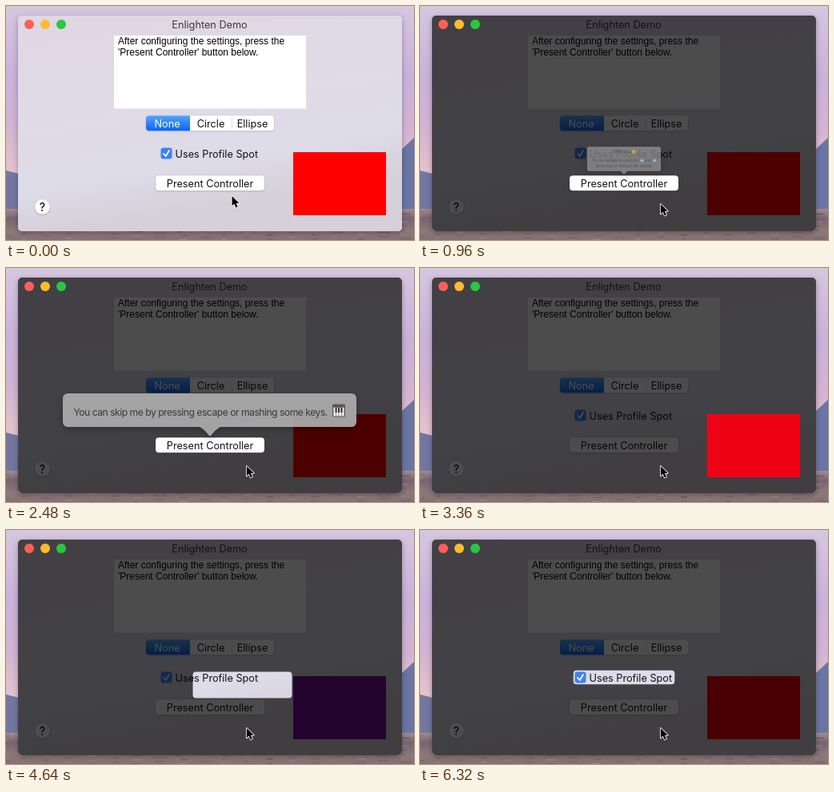
An HTML page with a canvas for the animation above (6.56 s loop, 510 by 293 pixels).

```html
<!DOCTYPE html>
<html lang="en">
<head>
<meta charset="utf-8">
<title>Enlighten Demo</title>
<style>
html, body { margin: 0; width: 100%; height: 100%; overflow: hidden; }
canvas { display: block; }
</style>
</head>
<body>
<canvas id="stage" width="510" height="293"></canvas>
<script>
const g = document.getElementById('stage').getContext('2d');
const LOOP = 6560, STEP = 80;
const UI = 'Inter, sans-serif', MONO = '"Noto Sans Mono", monospace', FIELD = '"Liberation Sans", Arial, sans-serif';
const BUTTON = [187, 212.3, 136, 19], VIEW = [359, 183, 116, 79], CHECK = [191.7, 175.7, 126.6, 17.6];
const RED = [255, 0, 0], PURPLE = [118, 13, 157];

const lerp = (a, b, k) => a + (b - a) * k;
const mix = (a, b, k) => a.map((v, i) => lerp(v, b[i], k));

// Piecewise linear track of [time, value] pairs.
function track(t, ...keys) {
  const n = keys.findIndex(k => k[0] > t);
  if (n === 0) return keys[0][1];
  if (n < 0) return keys[keys.length - 1][1];
  const [t0, a] = keys[n - 1], [t1, b] = keys[n];
  const k = (t - t0) / (t1 - t0);
  return Array.isArray(a) ? mix(a, b, k) : lerp(a, b, k);
}

function gradient(x0, y0, x1, y1, ...stops) {
  const paint = g.createLinearGradient(x0, y0, x1, y1);
  stops.forEach(([p, c]) => paint.addColorStop(p, c));
  return paint;
}
function rect(x, y, w, h, fill) {
  g.fillStyle = fill;
  g.fillRect(x, y, w, h);
}
function round(x, y, w, h, r, fill) {
  g.fillStyle = fill;
  g.beginPath();
  g.roundRect(x, y, w, h, r);
  g.fill();
}
function circle(x, y, r, fill) {
  g.fillStyle = fill;
  g.beginPath();
  g.arc(x, y, r, 0, 7);
  g.fill();
}
function poly(points, fill) {
  g.fillStyle = fill;
  g.beginPath();
  points.forEach(p => g.lineTo(...p));
  g.closePath();
  g.fill();
}
function text(s, x, y, { font = '12.7px ' + UI, color = '#111', align = 'left', spacing = 0 } = {}) {
  g.font = font;
  g.fillStyle = color;
  g.textAlign = align;
  g.letterSpacing = spacing + 'px';
  g.fillText(s, x, y);
}
function shadow(blur, alpha, dy, draw) {
  g.save();
  g.shadowBlur = blur;
  g.shadowOffsetY = dy;
  g.shadowColor = `rgba(0,0,0,${alpha})`;
  draw();
  g.restore();
}

function desktop() {
  rect(0, 0, 510, 293, gradient(0, 0, 0, 255,
    [0, '#d6c6de'], [.35, '#c9b2da'], [.6, '#d3b3d2'], [.8, '#e2c2cd'], [1, '#dcc4c8']));
  poly([[0, 206], [16, 210], [60, 232], [60, 258], [0, 258]], '#73779f');
  poly([[510, 165], [494, 180], [460, 215], [460, 255], [510, 255]], '#6a75a3');
  rect(0, 254, 510, 39, gradient(0, 254, 0, 293, [0, '#a48c92'], [.3, '#776470'], [.7, '#8d7779'], [1, '#857174']));
  // Rough desert floor.
  for (let i = 0; i < 160; i++) {
    const x = i * 83.7 % 530 - 10, y = 257 + i * 7.31 % 36;
    rect(x, y, 5 + i % 9, 1, i % 3 ? 'rgba(60,45,60,.28)' : 'rgba(220,190,180,.3)');
  }
}

function appWindow(view, pressed) {
  shadow(6, .3, 2, () => round(15, 12, 480, 270, 5, '#ddd8e2'));
  round(15, 12, 480, 270, 5, gradient(15, 12, 60, 282,
    [0, '#dfd7e3'], [.45, '#dfdae6'], [.8, '#dddce8'], [1, '#d6d0da']));
  text('Enlighten Demo', 254.5, 28, { align: 'center', color: '#3c3a3d' });

  rect(135, 37, 240, 91.5, '#fff');
  const field = { font: '12px ' + FIELD, color: '#000' };
  text('After configuring the settings, press the', 140, 48, field);
  text("'Present Controller' button below.", 140, 62, field);

  shadow(2, .25, .5, () => round(175, 137.3, 160, 19, 4, '#fff'));
  round(175, 137.3, 55, 19, [4, 0, 0, 4], gradient(0, 137, 0, 157, [0, '#55a5fa'], [1, '#0a62f5']));
  rect(282, 140, 1, 14, '#ddd');
  text('None', 201.5, 151.5, { align: 'center', color: '#fff' });
  text('Circle', 256, 151.5, { align: 'center' });
  text('Ellipse', 308, 151.5, { align: 'center' });

  round(193.5, 177.5, 14, 14, 3, '#3b82f6');
  g.strokeStyle = '#fff';
  g.lineWidth = 1.8;
  g.lineCap = g.lineJoin = 'round';
  g.beginPath();
  [[197, 185], [199.7, 188], [204, 181]].forEach(p => g.lineTo(...p));
  g.stroke();
  text('Uses Profile Spot', 211.5, 189.5);

  shadow(2, .3, .5, () => round(...BUTTON, 4, pressed ? '#2f7df6' : '#fff'));
  text('Present Controller', 255, 226.5, { align: 'center', color: pressed ? '#fff' : '#111' });

  shadow(2, .3, .5, () => circle(45.5, 251.5, 9.5, '#fff'));
  text('?', 45.5, 256.5, { align: 'center', font: '500 14px ' + UI });

  rect(...VIEW, `rgb(${view.map(Math.round)})`);
}

function dim(alpha, spot) {
  g.fillStyle = `rgba(0,0,0,${alpha})`;
  g.beginPath();
  g.roundRect(15, 12, 480, 270, 5);
  g.roundRect(...spot, spot === VIEW ? 0 : 4);
  g.fill('evenodd');
}

function arrowKey(x, y, dir) {
  round(x, y, 14, 14, 3, '#6aa5d8');
  const c = x + 7, m = y + 7;
  poly([[c + 4 * dir, m], [c, m - 4], [c, m - 1.3], [c - 4 * dir, m - 1.3],
    [c - 4 * dir, m + 1.3], [c, m + 1.3], [c, m + 4]], '#fff');
}
function piano(x, y) {
  round(x, y, 16, 16, 1.5, '#55504f');
  for (let i = 0; i < 4; i++) rect(x + 1.3 + i * 3.45, y + 4, 3, 11, '#f4f4f4');
  for (let i = 0; i < 3; i++) rect(x + 3.6 + i * 3.45, y + 4, 2, 6.5, '#222');
}

const popovers = [
  {
    box: [123.5, 112, 263, 87], tip: [255, 211], open: 960, close: 1640,
    draw() {
      text('Welcome', 214, 134, { font: '15px ' + UI, color: '#333' });
      circle(290, 129, 7.5, '#f3bd3e');
      const style = { font: '12.2px ' + UI, color: '#333', spacing: -.4 };
      text('You can navigate me using the', 141, 165, style);
      arrowKey(312, 154, -1);
      text('and', 331, 165, style);
      arrowKey(357, 154, 1);
      text('arrow keys, or clicking in the window.', 255, 184, { ...style, align: 'center' });
    }
  },
  {
    box: [71, 157, 367, 42], tip: [255, 211], open: 2000, close: 2460,
    draw() {
      text('You can skip me by pressing escape or mashing some keys.', 84.5, 184.5,
        { font: '12.2px ' + UI, color: '#333', spacing: -.52 });
      piano(408, 170.5);
    }
  },
  {
    box: [32, 188, 314, 69], tip: [358.5, 222.5], open: 3680, close: 4080,
    draw() {
      const style = { font: '12.2px ' + UI, color: '#000', spacing: -.37 };
      const code = { font: '13px ' + MONO, color: '#333' };
      text("I'm a", 45, 211, style);
      text('CustomView', 76, 211, code);
      text(', and I implement the two', 155, 211, style);
      text('animation methods of the', 45, 228, style);
      text('EnlightenSpotlight', 188.5, 228, code);
      text('protocol.', 45, 244, style);
    }
  },
  {
    box: [127.5, 78.5, 255.5, 86], tip: [255.5, 176], open: 4960, close: 5880,
    draw() {
      const style = { font: '12.2px ' + UI, color: '#000', spacing: -.2 };
      text("I'm the", 141, 102, style);
      text('usesProfileSpot', 184, 102, { font: '13.6px ' + MONO, color: '#333' });
      text('property. I', 312, 102, style);
      text('set whether the spotlight goes into a', 141, 119, style);
      text('Profile Spot', 141, 135, { ...style, font: 'italic ' + style.font });
      text('(the spotlight tightens on to', 210, 135, style);
      text('the view), like it is right now.', 141, 151, style);
    }
  }
];

function popover(t, { box, tip, open, close, draw }) {
  const scale = track(t, [open - 80, 0], [open, .35], [open + 80, 1.04], [open + 160, 1]);
  const alpha = track(t, [open - 80, 0], [open, .6], [open + 160, .93], [open + 240, 1], [close, 1], [close + 280, 0]);
  if (!scale || !alpha) return;
  const [x, y, w, h] = box, [tx, ty] = tip;
  const right = x + w, bottom = y + h;
  g.save();
  g.translate(tx, ty);
  g.scale(scale, scale);
  g.translate(-tx, -ty);
  g.globalAlpha = alpha;
  const shape = new Path2D();
  shape.roundRect(x, y, w, h, 6);
  if (tx > right) {
    shape.moveTo(right, ty - 12);
    shape.quadraticCurveTo(right + 2, ty - 9, tx, ty);
    shape.quadraticCurveTo(right + 2, ty + 9, right, ty + 12);
  } else {
    shape.moveTo(tx + 13, bottom);
    shape.quadraticCurveTo(tx + 9, bottom + 1, tx, ty);
    shape.quadraticCurveTo(tx - 9, bottom + 1, tx - 13, bottom);
  }
  g.fillStyle = '#adadad';
  shadow(10, .3, 3, () => g.fill(shape));
  draw();
  g.restore();
}

function pointer([x, y]) {
  g.save();
  g.translate(x, y);
  g.scale(.85, .85);
  g.beginPath();
  [[0, 0], [0, 14.5], [3.3, 11.4], [5.8, 17], [8.4, 15.8], [6, 10.5], [10.5, 10.4]].forEach(p => g.lineTo(...p));
  g.closePath();
  g.lineJoin = 'round';
  g.lineWidth = 2;
  g.strokeStyle = '#fff';
  g.stroke();
  g.fillStyle = '#000';
  g.fill();
  g.restore();
}

function frame(now) {
  const t = Math.floor(now % LOOP / STEP) * STEP;
  const tint = track(t, [3200, 0], [3360, .12], [3440, .12], [3920, 1], [5920, 1], [6320, .06]);
  const halfway = mix(BUTTON, VIEW, .5);
  const spot = t >= 3360 && t <= 4400 ? VIEW : track(t, [2640, BUTTON], [2960, halfway], [3120, halfway],
    [3360, VIEW], [4400, VIEW], [4720, CHECK]);
  g.clearRect(0, 0, 510, 293);
  desktop();
  appWindow(mix(RED, PURPLE, tint), t >= 240 && t < 400);
  dim(track(t, [320, 0], [640, .7]), spot);
  ['#ff5f57', '#febc2e', '#28c840'].forEach((c, i) => circle(29 + 20 * i, 23, 6, c));
  popovers.forEach(p => popover(t, p));
  pointer(track(t, [0, [282.5, 238]], [240, [284, 227]], [400, [284, 227]], [640, [300.8, 248]]));
  requestAnimationFrame(frame);
}
requestAnimationFrame(frame);
</script>
</body>
</html>
```
